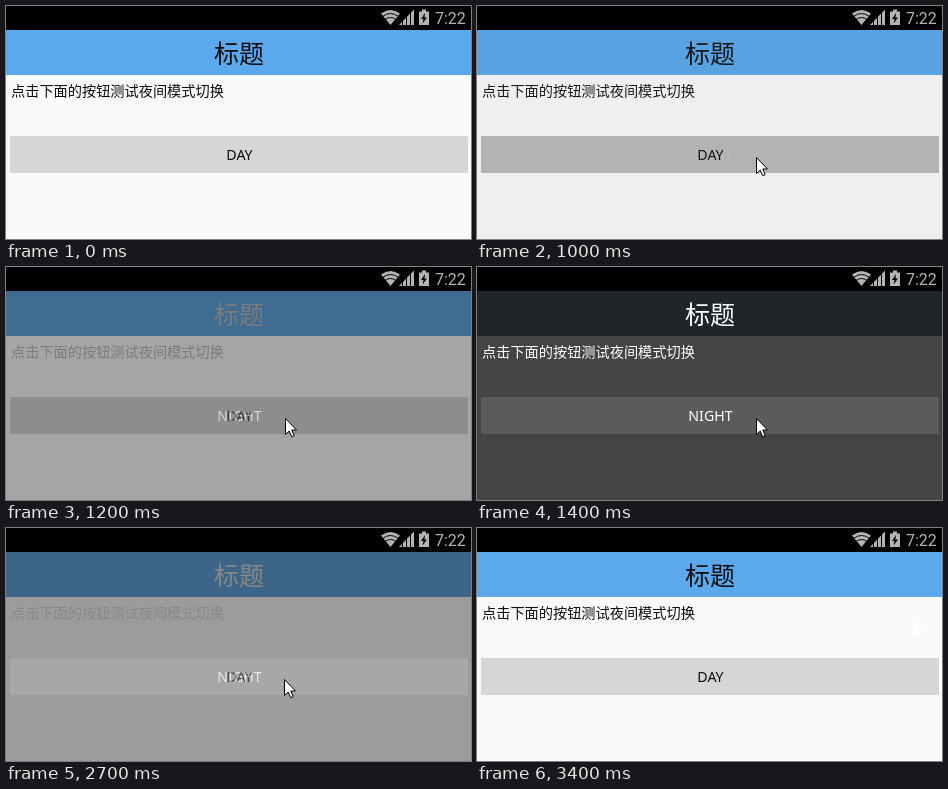
These frames come from a looping animation (465x233 px, 3700 ms). An HTML page:

```html
<!DOCTYPE html>
<html lang="zh-CN">
<head>
<meta charset="utf-8">
<title>夜间模式切换</title>
<style>
  html, body { margin: 0; width: 100%; height: 100%; overflow: hidden; background: #000; }
  svg { display: block; width: 465px; height: 233px; }
  text { font-family: "Noto Sans CJK SC", "Noto Sans CJK", sans-serif; fill: var(--ink); }
  .title { font-size: 25px; text-anchor: middle; }
  .note { font-size: 14.2px; }
  .label { font: 14.2px "Noto Sans", "Open Sans", sans-serif; text-anchor: middle; }
  .clock { font: 16px Roboto, sans-serif; fill: #b4b4b4; }
  .page { fill: var(--page); }
  .bar { fill: var(--bar); }

  .day { --page: #f9f9f9; --bar: #5ba9ec; --ink: #0c0c0c; }
  .night { --page: #444; --bar: #20252a; --ink: #fff; }

  .day, .button, .cursor { animation: 3.7s step-end infinite; }
  .day { animation-name: fade; }
  .day .button { fill: #d6d6d6; animation-name: press-day; }
  .night .button { fill: #5b5b5b; animation-name: press-night; }
  .cursor { fill: #fff; stroke: #000; animation-name: move; }

  @keyframes fade {
    0% { opacity: 1; }
    27.02% { opacity: .95; }
    29.72% { opacity: .78; }
    32.43% { opacity: .54; }
    35.13% { opacity: .22; }
    37.83% { opacity: 0; }
    70.27% { opacity: .2; }
    72.97% { opacity: .49; }
    75.67% { opacity: .77; }
    78.37% { opacity: .94; }
    81.08%, 100% { opacity: 1; }
  }
  @keyframes press-day {
    0% { fill: #d6d6d6; }
    24.32% { fill: #b8b8b8; }
    37.83%, 100% { fill: #d6d6d6; }
  }
  @keyframes press-night {
    0% { fill: #5b5b5b; }
    64.86%, 100% { fill: #7b7b7b; }
  }
  @keyframes move {
    0% { transform: translate(443px, 130px); visibility: hidden; }
    5.4% { transform: translate(443px, 130px); visibility: visible; }
    8.1% { transform: translate(392px, 158px); }
    10.8% { transform: translate(332px, 164px); }
    13.51% { transform: translate(291px, 157px); }
    16.21% { transform: translate(279px, 151px); }
    64.86% { transform: translate(278px, 151px); }
    83.78% { transform: translate(373px, 135px); }
    86.48% { transform: translate(435px, 91px); stroke: #000; }
    89.18% { transform: translate(453px, 54px); stroke: #000; }
    91.89%, 100% { transform: translate(435px, 91px); stroke: none; visibility: visible; }
  }
</style>
</head>
<body>
<svg viewBox="0 0 465 233">
  <defs>
    <g id="screen">
      <rect class="page" y="24" width="465" height="209"/>
      <rect class="bar" y="24" width="465" height="45"/>
      <text class="title" x="233" y="57">标题</text>
      <text class="note" x="5" y="90">点击下面的按钮测试夜间模式切换</text>
    </g>
  </defs>

  <g class="night">
    <use href="#screen"/>
    <rect class="button" x="4" y="130" width="458" height="37" rx="1"/>
    <text class="label" x="233.5" y="154">NIGHT</text>
  </g>
  <g class="day">
    <use href="#screen"/>
    <rect class="button" x="4" y="130" width="458" height="37" rx="1"/>
    <text class="label" x="233.5" y="154">DAY</text>
  </g>

  <!-- status bar -->
  <rect width="465" height="24"/>
  <g fill="#b4b4b4">
    <path d="M375 7.5Q384.500 0.500 394 7.500L384.500 19Z"/>
    <path d="M393 19L408 3.500V19Z"/>
    <path d="M413 5.500H416V3.500H420V5.500H423V19H413Z"/>
  </g>
  <g fill="none" stroke="#000">
    <path d="M376.500 10.500Q384.500 4.500 392.500 10.500M379 13.500Q384.500 9.500 390 13.500"/>
    <path d="M396.500 3V19M400.500 3V19M404.500 3V19"/>
  </g>
  <path d="M419 7L415 13H417.500L416.500 17.500L421 11.500H418.500Z"/>
  <text class="clock" x="429" y="18">7:22</text>

  <path class="cursor" d="M.5 .5V16.500L4.200 13L6.700 18.700L9.200 17.600L6.800 12H11.500Z"/>
</svg>
</body>
</html>
```
